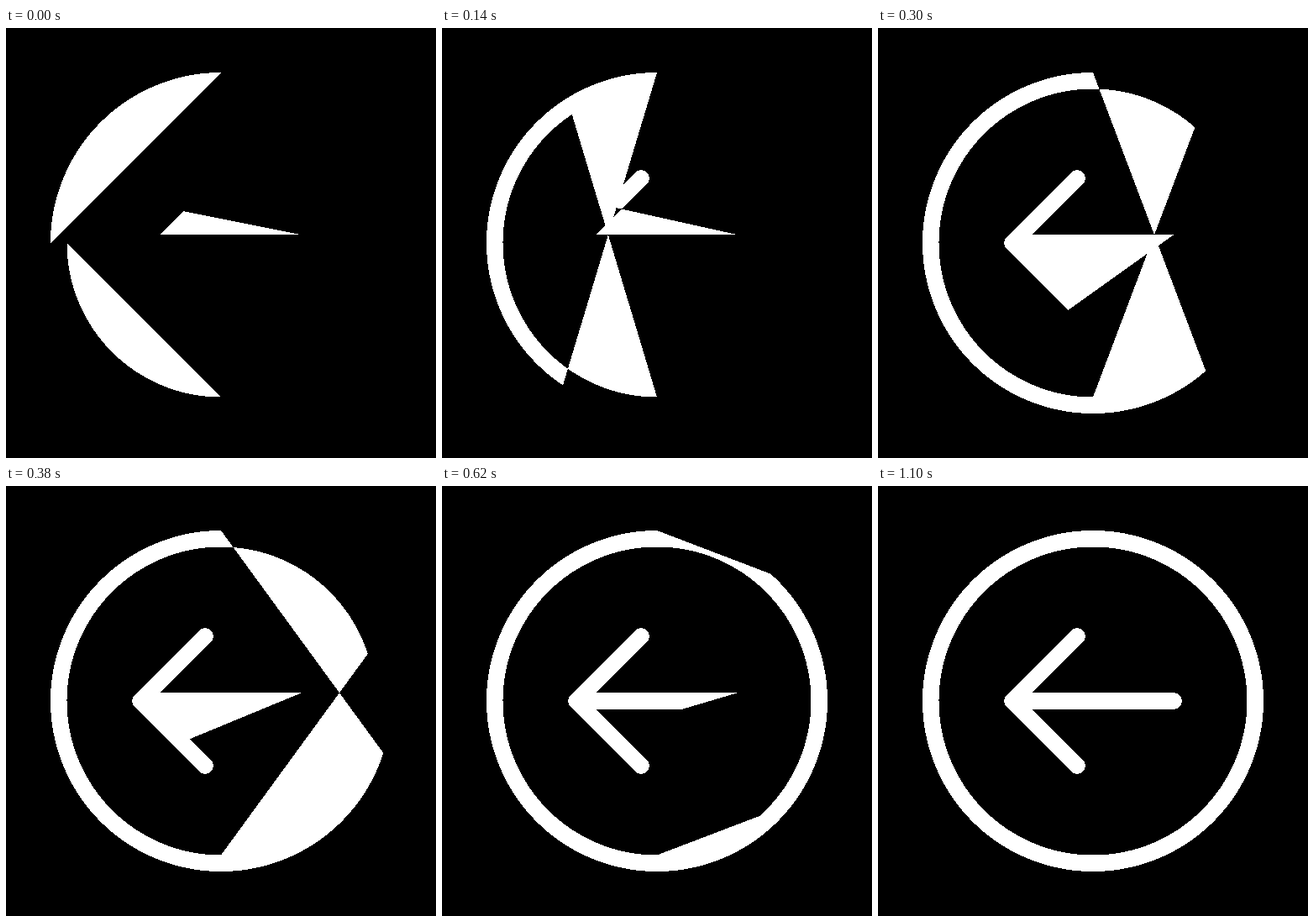
Recreate the animation shown at these times as an HTML page. Size 512 px wide and 512 px high, loop 1.6 s.

```html
<!DOCTYPE html>
<html lang="en">
<head>
<meta charset="utf-8">
<title>Back arrow</title>
<style>
  html, body { margin: 0; width: 100%; height: 100%; overflow: hidden; background: #000; }
  svg { display: block; width: 100vw; height: 100vh; }
  path { fill: #fff; shape-rendering: crispEdges; }
</style>
</head>
<body>
<svg viewBox="0 0 512 512">
  <path id="ring" fill-rule="evenodd"/>
  <path id="arrow"/>
</svg>
<script>
const LOOP = 1600, STEP = 20;

// Drawn share of each outline: time, value, slope per second
const KEYS = [
  [0, 0.25, 1.02],
  [140, 0.407, 1.24],
  [300, 0.615, 1.16],
  [460, 0.7735, 0.84],
  [620, 0.884, 0.552],
  [780, 0.951, 0.306],
  [1100, 1, 0]
];

function progress(t) {
  const i = KEYS.findIndex(k => k[0] > t);
  if (i < 0) return 1;
  const [t0, v0, m0] = KEYS[i - 1], [t1, v1, m1] = KEYS[i];
  const d = (t1 - t0) / 1000, s = (t - t0) / (t1 - t0), r = 1 - s;
  return v0 * (1 + 2 * s) * r * r + v1 * (3 - 2 * s) * s * s
    + d * (m0 * s * r * r - m1 * s * s * r);
}

// Points along an arc, angles in degrees
function arc(cx, cy, r, from, to, n) {
  return Array.from({ length: n + 1 }, (_, i) => {
    const a = (from + (to - from) * i / n) * Math.PI / 180;
    return [cx + r * Math.cos(a), cy + r * Math.sin(a)];
  });
}

const dist = (a, b) => Math.hypot(b[0] - a[0], b[1] - a[1]);

// Closed path over the first share p of an outline
function trim(pts, p) {
  let left = p * pts.reduce((sum, q, i) => i ? sum + dist(pts[i - 1], q) : 0, 0);
  const out = [pts[0]];
  for (let i = 1; i < pts.length && left > 0; i++) {
    const a = pts[i - 1], b = pts[i], len = dist(a, b);
    const k = len ? Math.min(1, left / len) : 1;
    out.push([a[0] + (b[0] - a[0]) * k, a[1] + (b[1] - a[1]) * k]);
    left -= len;
  }
  return "M" + out.map(q => q[0].toFixed(2) + " " + q[1].toFixed(2)).join("L") + "Z";
}

const R = 9.75;
const outer = arc(256, 256, 203, -90, -450, 360);
const inner = arc(256, 256, 183.5, 90, 450, 360);
const outline = [
  [352, 256 - R], [183.5, 256 - R],
  ...arc(237, 179, R, 45, -135, 24),
  ...arc(160, 256, R, -135, -225, 12),
  ...arc(237, 333, R, 135, -45, 24),
  [183.5, 256 + R],
  ...arc(352, 256, R, 90, -90, 24)
];

const ring = document.getElementById("ring");
const arrow = document.getElementById("arrow");

function draw(now) {
  const t = Math.floor(now % LOOP / STEP) * STEP;
  const p = progress(t);
  ring.setAttribute("d", trim(outer, p) + trim(inner, p));
  arrow.setAttribute("d", trim(outline, p));
}

let start;
function tick(now) {
  start ??= now;
  draw(now - start);
  requestAnimationFrame(tick);
}
draw(0);
requestAnimationFrame(tick);
</script>
</body>
</html>
```
